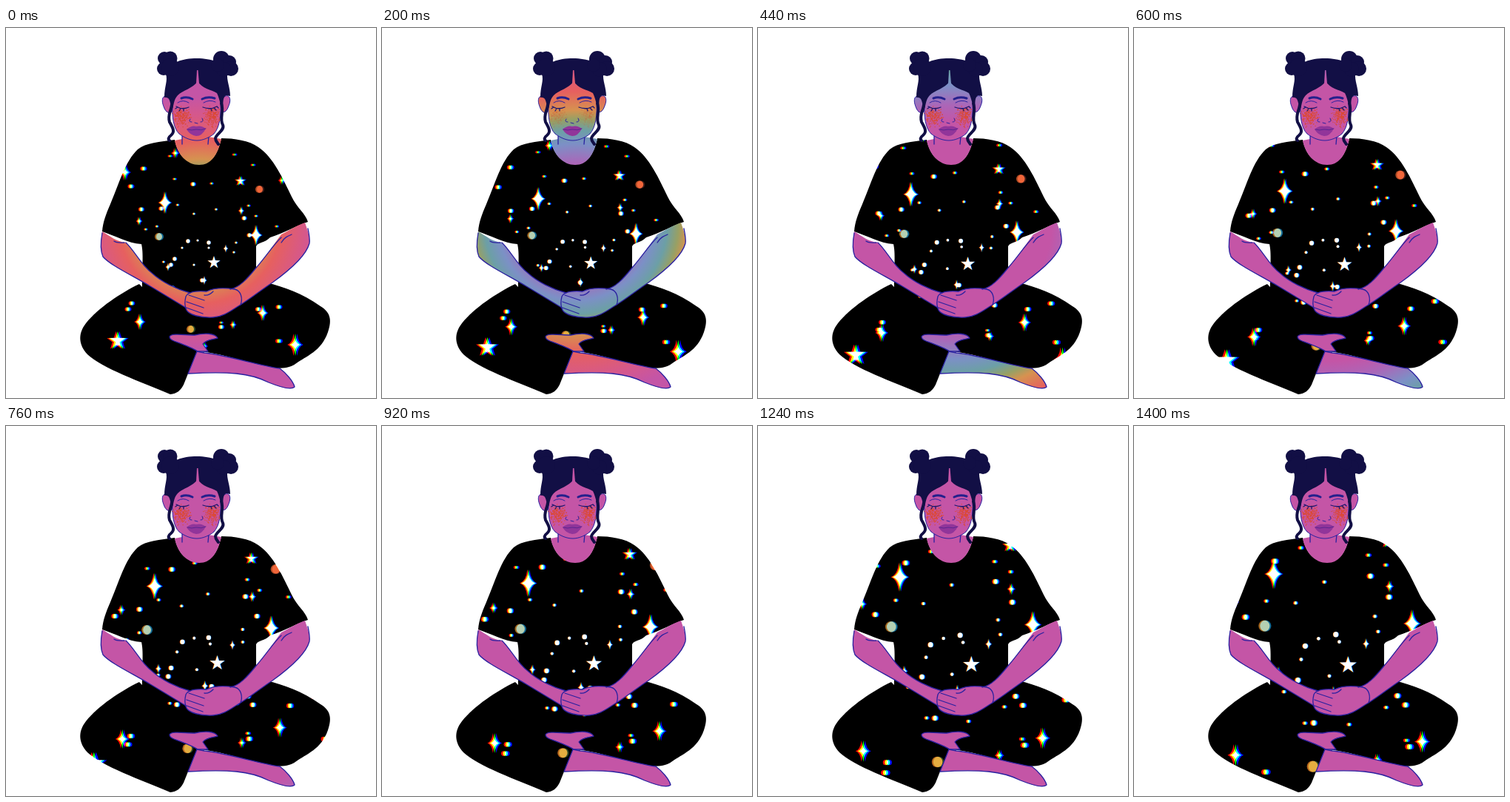
Recreate the animation shown at these times as an HTML page with a canvas. Size 500 px wide and 500 px high, loop 1.44 s.

```html
<!DOCTYPE html>
<html lang="en">
<head>
<meta charset="utf-8">
<title>Meditation</title>
<style>
  html, body { margin: 0; height: 100%; overflow: hidden; background: #fff; }
  canvas { display: block; }
</style>
</head>
<body>
<canvas width="500" height="500"></canvas>
<script>
const ctx = document.querySelector('canvas').getContext('2d');
const LOOP = 1440, STEP = 40, LINE = '#2a20a0', HAIR = '#120f45';
const TAU = Math.PI * 2;

const shirt = new Path2D('M228 151C208 154 189 155 178 164C161 180 153 210 141 238C135 252 131 262 130 275C146 280 165 291 183 292C186 305 184 322 184 350L180 346C155 358 125 378 108 399C97 413 98 428 110 441C130 460 182 478 222 495C231 494 236 490 240 482L246 467L258 437L265 437C300 442 330 454 360 459C376 461 385 458 391 454C406 443 426 437 435 411C441 394 438 384 425 376C400 358 375 350 352 344L338 350L338 295C341 289 349 291 357 283C376 277 395 266 408 262C405 251 393 243 386 228C375 205 361 174 341 161C329 152 308 149 291 149C286 172 277 184 261 184C245 184 232 172 228 151Z');
const leftArm = new Path2D('M130 275C128 288 127 300 131 309C140 320 170 334 195 349C215 361 230 370 243 378L249 358C230 353 210 343 197 331C182 320 174 301 162 290C150 289 140 281 130 275Z');
const rightArm = new Path2D('M404 263C408 275 411 283 410 291C406 306 385 326 360 344C345 354 330 366 317 374L300 354C315 351 326 339 338 324C352 308 362 292 372 279C382 274 392 267 404 263Z');
const hands = new Path2D('M243 363C246 356 258 355 271 356C281 351 296 351 309 353C318 355 320 366 317 374C305 381 295 390 280 391C265 392 245 388 243 379C241 373 242 367 243 363Z');
const upperFoot = new Path2D('M221 417C224 412 240 415 255 415C268 412 282 412 286 419C279 421 270 421 266 427L273 437L259 437C252 432 235 426 227 423C222 421 221 419 221 417Z');
const lowerFoot = new Path2D('M258 437L268 439C300 442 340 456 370 460C378 466 388 477 390 485C385 490 370 485 355 479C330 466 300 464 246 467Z');
const neck = new Path2D('M238 140L238 150L228 152C232 172 245 185 261 185C277 185 286 172 291 150L274 147L274 138Z');
const face = new Path2D('M225 100C224 120 226 135 234 143C242 149 250 152 258 152C266 152 275 148 281 143C289 134 291 118 290 96L275 62L240 62Z');
const ears = new Path2D('M222 94C212 88 209 96 213 106C216 115 221 116 224 113ZM293 94C302 87 305 96 301 105C298 114 294 115 291 112Z');
const hair = new Path2D('M214 94C214 78 219 72 216 62C222 46 238 41 258 41C278 41 294 47 299 60C298 72 303 80 303 92L298 91C292 93 294 102 293 108C289 104 289 96 285 88C277 83 265 82 259 72C252 82 239 84 232 91C226 97 227 106 224 112C222 102 222 92 214 94Z');
const strands = new Path2D('M224 104C223 112 218 118 221 127C225 134 229 140 223 145C219 148 219 151 221 152M291 102C295 113 288 122 293 131C296 138 284 143 283 149C283 153 286 155 287 157');
const bodyLines = new Path2D('M130 277C128 288 127 300 131 309C140 320 170 334 195 349C215 361 230 370 243 378M162 290C174 301 182 320 197 331C210 343 230 353 249 358M146 288C150 291 156 290 160 290M408 271C410 281 411 286 410 291C406 306 385 326 360 344C345 354 330 366 317 374M372 283C362 292 352 308 338 324C326 339 315 351 303 353M372 290C376 283 381 281 386 279M247 361L268 368M244 370L267 378M244 378L266 386M268 361C273 362 277 359 280 356M238 146L238 157M274 146L273 157');
const faceLines = new Path2D('M232 101Q239 96 247 101M267 101Q275 96 283 100M249 123Q246 127 251 127M263 127Q268 127 265 122M255 128L259 129');
const lashes = new Path2D('M230 106Q238 111 247 107M266 107Q276 111 285 106M232 107L229 109M236 109L234 112M240 109L240 112M281 108L284 111M277 109L278 112M285 106L287 108');
const brows = new Path2D('M237 95Q244 92 252 96M265 96Q273 92 282 95');
const lips = new Path2D('M244 137Q251 131 257 133Q264 131 270 136Q265 146 257 146Q249 145 244 137Z');
const parting = new Path2D('M258 57L259.5 57L261 75L257 75Z');

// Sparkles: x, y, radius
const sparkles = [
  [215, 236, 15], [338, 280, 14], [318, 247, 6], [297, 298, 5.5], [180, 261, 6],
  [219, 323, 5.5], [268, 341, 6], [181, 397, 11], [347, 385, 11], [391, 428, 15],
  [307, 401, 6], [268, 430, 6], [161, 195, 11], [229, 169, 7], [373, 206, 6]
];
const stars = [[281, 317, 9], [317, 207, 7], [151, 423, 13]];
const smallDots = [
  [222, 173], [228, 204], [278, 210], [284, 245], [254, 251], [232, 239], [189, 272],
  [204, 268], [213, 316], [259, 287], [238, 297], [254, 320], [274, 297], [308, 303],
  [311, 290], [338, 254], [328, 240], [366, 268], [309, 171], [334, 185],
  [291, 398], [287, 365], [252, 365], [218, 348]
];
const bigDots = [
  [253, 211], [186, 190], [169, 214], [210, 244], [183, 245], [246, 288], [274, 290],
  [228, 312], [223, 320], [265, 341], [329, 280], [322, 257], [170, 372], [165, 380],
  [341, 380], [369, 377], [369, 423], [291, 404], [300, 360], [303, 370], [225, 351]
];
// Coloured discs: x, y, left tint, right tint
const discs = [
  [343, 218, '#b04a22', '#401c18'],
  [207, 282, '#a5661c', '#106a96'],
  [250, 407, '#b8651c', '#2c4824']
];
// Colour wave: distance from the wave's orange band, colour
const wave = [
  [-95, '#c455a6'], [-72, '#ab66b8'], [-45, '#7c90c6'], [-27, '#6c9fa6'], [-12, '#98a064'],
  [0, '#d69250'], [25, '#e6605f'], [60, '#d5588c'], [85, '#c455a6']
];

let seed = 7;
const random = () => (seed = seed * 16807 % 2147483647) / 2147483647;
const freckles = Array.from({ length: 420 }, (_, i) => {
  const a = random() * TAU, r = Math.sqrt(random()) * (0.4 + 0.6 * random());
  return [(i % 2 ? 237 : 278) + Math.cos(a) * r * 14, 119 + Math.sin(a) * r * 16];
});

function fill(style, ...paths) {
  ctx.fillStyle = style;
  for (const p of paths) ctx.fill(p);
}

function stroke(style, width, ...paths) {
  ctx.strokeStyle = style;
  ctx.lineWidth = width;
  for (const p of paths) ctx.stroke(p);
}

function disc(x, y, r) {
  ctx.beginPath();
  ctx.arc(x, y, r, 0, TAU);
  ctx.fill();
}

function sparkle(x, y, r) {
  const w = r * 0.52;
  ctx.beginPath();
  ctx.moveTo(x, y - r);
  for (const [px, py] of [[w, 0], [0, r], [-w, 0], [0, -r]]) {
    const cx = px || (x < 0 ? 0 : 0);
    ctx.lineTo(x + cx, y + py);
  }
  ctx.closePath();
  ctx.fill();
}

function fourPoint(x, y, r) {
  const w = r * 0.55, k = 0.17;
  ctx.beginPath();
  ctx.moveTo(x, y - r);
  ctx.quadraticCurveTo(x + w * k, y - r * k, x + w, y);
  ctx.quadraticCurveTo(x + w * k, y + r * k, x, y + r);
  ctx.quadraticCurveTo(x - w * k, y + r * k, x - w, y);
  ctx.quadraticCurveTo(x - w * k, y - r * k, x, y - r);
  ctx.fill();
}

function fivePoint(x, y, r) {
  ctx.beginPath();
  for (let i = 0; i < 10; i++) {
    const a = i * TAU / 10 - TAU / 4, q = i % 2 ? r * 0.4 : r;
    ctx.lineTo(x + Math.cos(a) * q, y + Math.sin(a) * q);
  }
  ctx.fill();
}

// Splits a white shape into colour fringes that widen away from the middle
function fringed(shape, x, y, r) {
  const d = Math.hypot(x - 265, y - 300) * 0.014;
  ['#f00', '#0f0', '#00f'].forEach((color, i) => {
    ctx.fillStyle = color;
    shape(x + (i - 1) * d, y, r);
  });
}

function drawSky(u) {
  const grow = 1 + 0.52 * u;
  const zoom = (x, y) => [265 + (x - 265) * grow, 305 + (y - 305) * grow];
  const scale = Math.exp(0.454 * u), c = scale * Math.cos(0.433 * u), s = scale * Math.sin(0.433 * u);
  const swirl = (x, y) => [
    266 + (x - 266) * c + (y - 297) * s,
    297 + (y - 297) * c - (x - 266) * s
  ];
  ctx.globalCompositeOperation = 'lighter';
  for (const [x, y, left, right] of discs) {
    const [px, py] = zoom(x, y), r = 5 * grow;
    ctx.fillStyle = left;
    disc(px - 1, py, r);
    ctx.fillStyle = right;
    disc(px + 1, py, r);
  }
  for (const [x, y, r] of sparkles) fringed(fourPoint, ...zoom(x, y), r * (1 + 0.35 * u));
  for (const [x, y, r] of stars) fringed(fivePoint, ...zoom(x, y), r * (1 + 0.35 * u));
  for (const [x, y] of smallDots) fringed(disc, ...swirl(x, y), 1.6 + 0.8 * u);
  for (const [x, y] of bigDots) fringed(disc, ...swirl(x, y), 2.7 + u);
  ctx.globalCompositeOperation = 'source-over';
}

function skinTone(front) {
  const reach = 700, g = ctx.createRadialGradient(262, 262, 0, 262, 262, reach);
  for (const [offset, color] of wave) {
    g.addColorStop(Math.min(1, Math.max(0, (front + offset) / reach)), color);
  }
  return g;
}

function drawHead(skin, front) {
  fill(skin, ears, face);
  stroke(LINE, 1, ears, face);
  ctx.globalAlpha = 1 - 0.85 * Math.exp(-(((front - 155) / 42) ** 2));
  ctx.fillStyle = '#dc4a34';
  for (const [x, y] of freckles) ctx.fillRect(x, y, 1.2, 1.2);
  ctx.globalAlpha = 1;
  stroke(LINE, 1, faceLines);
  stroke('#1c1770', 1.3, lashes);
  stroke('#24208c', 3, brows);
  fill('#91359a', lips);
  stroke('#5c2590', 1, new Path2D('M245 137Q251 139 257 137Q264 139 270 136'));
  fill(HAIR, hair);
  stroke(HAIR, 4, strands);
  fill(skin, parting);
  ctx.fillStyle = HAIR;
  for (const [x, y, r] of [
    [214, 41, 9], [222, 41, 9.5], [213, 55, 9], [222, 53, 12],
    [291, 42, 11], [302, 46, 9], [304, 55, 10], [294, 56, 10], [286, 50, 9]
  ]) disc(x, y, r);
}

function draw(t) {
  const front = 85 + 0.33 * t, skin = skinTone(front);
  ctx.fillStyle = '#fff';
  ctx.fillRect(0, 0, 500, 500);
  fill('#000', shirt);
  drawSky(t / 1400);
  fill(skin, neck, upperFoot, lowerFoot, leftArm, rightArm, hands);
  stroke(LINE, 1.3, bodyLines, hands, upperFoot, lowerFoot);
  drawHead(skin, front);
}

ctx.lineCap = ctx.lineJoin = 'round';
function tick(now) {
  draw(Math.floor(now % LOOP / STEP) * STEP);
  requestAnimationFrame(tick);
}
draw(0);
requestAnimationFrame(tick);
</script>
</body>
</html>
```
